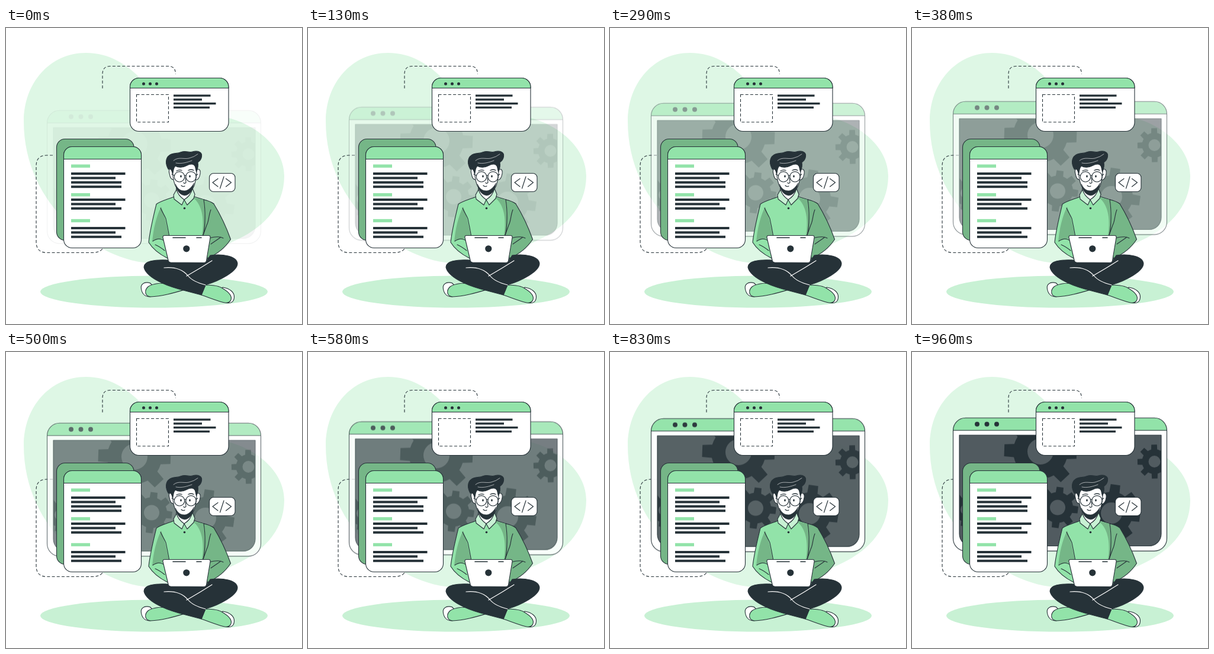
These frames come from a looping animation (500 by 500 pixels, 1040 ms). An HTML page:

```html
<!DOCTYPE html>
<html lang="en">
<head>
<meta charset="utf-8">
<title>Web development</title>
<style>
  html, body { margin: 0; width: 100%; height: 100%; overflow: hidden; background: #fff; }
  svg { display: block; width: 100%; height: 100%; }
  .ink { fill: #263238; }
  .green { fill: #92e3a9; }
  .shade { fill: #75b687; }
  .pale { fill: #c8f1d4; }
  .white { fill: #fff; }
  .line { stroke: #263238; stroke-width: 1.1; stroke-linecap: round; stroke-linejoin: round; }
  .none { fill: none; }
  .dash { fill: none; stroke: #263238; stroke-width: 1.1; stroke-dasharray: 5 3.2; }
</style>
</head>
<body>
<svg viewBox="0 0 500 500">
  <defs>
    <path id="screen" d="M80 140.200H421V307a20.500 20.500 0 0 1-20.500 20.500H100.500A20.500 20.500 0 0 1 80 307Z"/>
    <clipPath id="pane"><use href="#screen"/></clipPath>
  </defs>

  <path fill="#def7e5" d="M135 42C75 42 30 92 30 158C30 230 62 288 100 325C140 363 185 393 245 397.500C300 401 340 382 385 360C430 340 470 305 470 250C470 203 425 165 376 152C330 139 268 125 227 85C204 62 175 42 135 42Z"/>
  <ellipse class="pale" cx="250" cy="445.500" rx="192" ry="27"/>

  <path class="dash" d="M163 102V78Q163 64.500 176 64.500H274Q286.500 64.500 286.500 78"/>
  <path class="dash" d="M79 215H69Q51 215 51 233V361Q51 379.500 69 379.500H147Q158 379.500 164 372"/>

  <g id="back">
    <rect class="white" x="69.500" y="111.200" width="361" height="224.900" rx="21"/>
    <path class="green" d="M69.500 132.200a21 21 0 0 1 21-21H409.500a21 21 0 0 1 21 21Z"/>
    <path class="line none" d="M69.500 132.200H430.500"/>
    <rect class="line none" x="69.500" y="111.200" width="361" height="224.900" rx="21"/>
    <g class="ink"><circle cx="110" cy="121.800" r="4"/><circle cx="126.500" cy="121.800" r="4"/><circle cx="143" cy="121.800" r="4"/></g>
    <use href="#screen" fill="#515b60"/>
    <g id="gears" class="ink" fill-rule="evenodd" clip-path="url(#pane)"></g>
    <use href="#screen" class="line none"/>
  </g>

  <g class="line">
    <rect class="white" x="209.500" y="84.500" width="166.500" height="90" rx="15"/>
    <path class="green" d="M209.500 101.500V99.500a15 15 0 0 1 15-15H361a15 15 0 0 1 15 15V101.500Z"/>
    <rect class="shade" x="85.500" y="187.500" width="130.500" height="171" rx="14"/>
    <rect class="white" x="97.500" y="200.500" width="131" height="171" rx="14"/>
    <path class="green" d="M97.500 221.500V214.500a14 14 0 0 1 14-14H214.500a14 14 0 0 1 14 14V221.500Z"/>
  </g>
  <g class="ink"><circle cx="232.500" cy="94.300" r="2.500"/><circle cx="243.500" cy="94.300" r="2.500"/><circle cx="254.500" cy="94.300" r="2.500"/></g>
  <rect class="dash" x="220.500" y="112.500" width="54" height="46.500"/>
  <g id="bars"></g>

  <!-- torso and arms -->
  <g class="line">
    <path class="green" d="M284 285C271 290 260 293 254 297.500C249 318 243 342 241 362C247 372 259 382 273 389L340 391L347 360L351 297C343 292 332 289 318 285Z"/>
    <path class="shade" stroke="none" d="M262 302C254 318 249 338 247 361C252 358 260 356 266 355L270 360L275 350C272 338 270 326 267 316Z"/>
    <path class="shade" stroke="none" d="M315 286L334 290L338 350H331C335 328 333 298 315 286Z"/>
    <path class="shade" d="M334 290C341 291.500 347 294 351 297C362 315 372 336 379.500 357C371 370 357 382 340 389L333 350C337 335 337 308 334 290Z"/>
    <path class="none" d="M261 304C264 311 268 317 270 322Q273 336 275.500 350M346 307C342 317 343 326 339 333L333 350M248 360C255 355 261 355 267 359M252 366C257 368 263 372 268 376M343 355C354 352 362 352 367 355M346 365L362 354"/>
  </g>

  <!-- head -->
  <g class="line">
    <path class="white" d="M288 268L287 281L301 291L315 278V266Z"/>
    <path class="white" d="M282 241C278 235 274 239 276 246C277 252 279 257 284 256Z"/>
    <path class="white" d="M321 241C325 236 329 239 328 246C327 253 324 258 319 256Z"/>
    <path class="white" d="M281 232C281 250 283 262 288 270C292 278 297 281 302 281C309 280 315 274 318 266C321 257 323 246 322 229Z"/>
    <path class="ink" d="M281.500 247C280 239 277 236 274.500 239C269 230 269 220 276 215C282 210 289 213 296 209.500C304 206.500 309 211 315 209C324 206 332 210 330.500 217C330 222 327 225 324 227C325 233 324 238 321.500 243L319.500 234C317 229 311 229 306 232C299 236 291 236 286 233C282 237 283 242 281.500 247Z"/>
    <path class="ink" stroke-width=".5" d="M286.500 264C290 272 295 275 302 275C309 274 314 268 317.500 262C316 273 311 282 302 283C293 282 288 274 286.500 264Z"/>
    <path fill="none" stroke="#fff" stroke-width=".6" d="M283 224C291 217 300 222 309 220Q318 218 324 213M287 228C296 230 306 227 314 224"/>
    <g class="none">
      <circle cx="293" cy="251.300" r="8.700"/><circle cx="312.500" cy="251.300" r="8.700"/>
      <path d="M301.500 250Q302.700 248 304 250M284 249L280 247M321 249L324 247M303 252L304 261Q301 264 300 261M296 266Q299 269 302 267"/>
      <path stroke-width="1.300" d="M288 241.500Q292 239 297 240.500M308 240.500Q313 238 317 240.500"/>
    </g>
    <ellipse class="ink" stroke="none" cx="295.500" cy="250.500" rx="1.300" ry="2"/>
    <ellipse class="ink" stroke="none" cx="310.500" cy="250.500" rx="1.300" ry="2"/>
    <path class="pale" d="M288 273L283 282L284 289L297 299L301 290C295 286 290 280 288 273Z"/>
    <path class="pale" d="M315 271L319 281L317 288L306 299L301 290C308 286 313 279 315 271Z"/>
    <circle class="ink" stroke="none" cx="301.500" cy="304.500" r="1.800"/>
  </g>

  <!-- legs and shoes -->
  <g class="line">
    <path class="white" d="M243 430.500C232 428 227 434 228.500 441C230 449 235 454 243 454L262 449Z"/>
    <path class="green" d="M240 437C246 432.500 260 431 270 431L305 441C285 447 264 453.500 244 454C234 453 233.500 443 240 437Z"/>
    <path class="white" d="M366 438C379 440 386 447 385.500 455C385 462 381 465 374 464.500L355 459Z"/>
    <path class="green" d="M337 434C350 434 361 436 367 440.500C376 446 382 453 380 459C378 464.500 373 465 367 463.500C354 460 342 455 330 451Z"/>
    <path class="ink" d="M273 392C250 391 233 394 233 404C236 420 266 434 292 441L330 451L337 434C361 427 391 411 391 398C390 385 365 381 345 384L338 395Z"/>
    <path fill="none" stroke="#fff" stroke-width="1.200" d="M267 405C288 403 299 409 307 418C314 427 325 431 337 434M348 393C334 402 319 411 305 419"/>
  </g>

  <!-- laptop -->
  <g class="line">
    <path class="white" d="M268 350.500H342Q345.500 350.500 345 354L338.500 393Q338 396.500 334 396.500L278 396Q274.500 395.500 274 392L265 354Q264.500 350.500 268 350.500Z"/>
    <path class="none" stroke-width="1.600" d="M282 354.300H303M322 354.300H330"/>
    <circle class="ink" stroke="none" cx="304.800" cy="372.800" r="5.600"/>
  </g>

  <!-- code tag -->
  <g class="line">
    <rect class="white" x="343.500" y="245.500" width="43.500" height="31" rx="7"/>
    <path class="none" stroke-width="1.200" d="M358 254.500L349 261L358 268M368 251L361.500 271M371.500 254.500L380.500 261L371.500 268"/>
  </g>
</svg>
<script>
  const $ = id => document.getElementById(id);

  const bar = (x, y, w, h, c) => `<rect class="${c}" x="${x}" y="${y}" width="${w}" height="${h}"/>`;
  const rows = (x, y, step, h, widths) => widths.map((w, i) => bar(x, y + i * step, w, h, 'ink')).join('');
  $('bars').innerHTML =
    rows(283, 112.5, 6.7, 3.4, [62.5, 48, 71.5, 61]) +
    rows(110, 244, 7.4, 4, [91.5, 75, 85, 85]) +
    rows(110, 288, 7.4, 4, [91.5, 75, 85]) +
    rows(110, 336, 7.4, 4, [91.5, 75, 85]) +
    [230.5, 279, 322.8].map(y => bar(110, y, 32, 5.4, 'green')).join('');

  // Eight-toothed wheel with a round hole
  function gear(x, y, hole, body, tip, turn) {
    const at = (r, deg) => {
      const a = deg * Math.PI / 180;
      return (x + r * Math.cos(a)).toFixed(2) + ' ' + (y + r * Math.sin(a)).toFixed(2);
    };
    let d = '';
    for (let i = 0; i < 8; i++) {
      const a = turn + i * 45;
      d += `${i ? 'A' + [body, body, 0, 0, 1].join(' ') : 'M'} ${at(body, a - 14)}` +
           `L${at(tip, a - 9.5)}L${at(tip, a + 9.5)}L${at(body, a + 14)}`;
    }
    d += `A${body} ${body} 0 0 1 ${at(body, turn - 14)}Z`;
    d += `M${x - hole} ${y}a${hole} ${hole} 0 1 0 ${2 * hole} 0a${hole} ${hole} 0 1 0 ${-2 * hole} 0Z`;
    return `<path d="${d}"/>`;
  }
  $('gears').innerHTML =
    gear(217, 168, 22, 46, 62, 2) +
    gear(246, 262.5, 13, 26, 35, 7) +
    gear(409.5, 185, 10, 21, 29, -1) +
    gear(337, 272, 18, 36, 49, 8) +
    gear(92, 266, 10, 21, 29, 10);

  const LOOP = 1040, LAST = 23;
  const starts = Array.from({ length: LAST + 1 }, (_, i) => Math.round(i * 100 / 24) * 10);
  const rise = $('back').animate(
    [{ opacity: 0, transform: 'translateY(30px)' }, { opacity: 1, transform: 'translateY(0)' }],
    { duration: 1000, easing: 'ease-out', fill: 'both' });
  rise.pause();

  const begin = performance.now();
  function draw() {
    const t = (performance.now() - begin) % LOOP;
    const step = starts.filter(s => s <= t).length;
    rise.currentTime = step * 40;
    requestAnimationFrame(draw);
  }
  draw();
</script>
</body>
</html>
```
